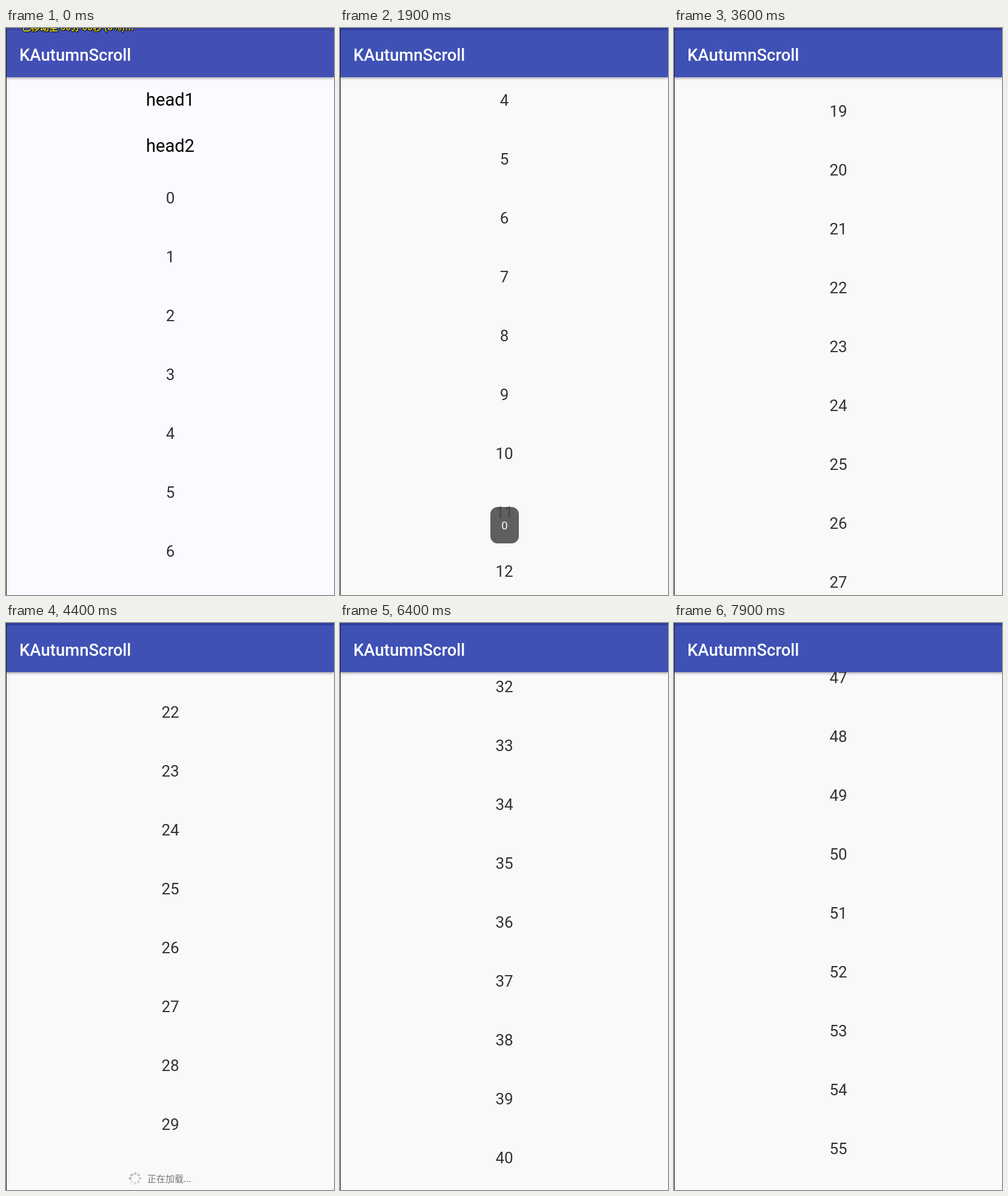
An HTML page for the animation above (8 s loop, 541 by 934 pixels).

```html
<!DOCTYPE html>
<html lang="en">
<head>
<meta charset="utf-8">
<title>Scrolling list</title>
<style>
html, body { margin: 0; width: 100%; height: 100%; overflow: hidden; }
body { font-family: Roboto, sans-serif; }
#stage { position: relative; width: 541px; height: 934px; overflow: hidden; background: #f9f9f9; }
#stage.intro { background: #fcfaff; }
#list { position: absolute; left: 1px; top: 80px; width: 540px; text-align: center; }
.head { height: 76px; font-size: 29px; line-height: 76px; color: #000; }
.item { height: 97px; font-size: 26px; line-height: 97px; color: #333; }
#footer { position: absolute; left: 0; top: 3062px; width: 540px; height: 97px; background: #f9f9f9; }
#loader { position: absolute; inset: 0; }
#spinner { position: absolute; left: 201px; top: 29px; }
#loader span {
  position: absolute; left: 232px; top: 28px; white-space: nowrap;
  font: 15px/24px "Noto Sans CJK SC", "Noto Sans CJK", sans-serif; color: #777;
}
#bar {
  position: absolute; left: 0; top: 0; width: 541px; height: 81px; box-sizing: border-box;
  background: #3f51b5; border-top: 4px solid #303f9f; box-shadow: 0 2px 4px rgba(0, 0, 0, .32);
}
.intro #bar { background: #424fb5; border-color: #3a46a4; }
#bar h1 { margin: 0; padding-left: 22px; font-size: 27.5px; font-weight: 500; line-height: 82px; color: #fff; }
#caption {
  display: none; position: absolute; left: 26px; top: -12px; white-space: pre;
  font: bold 15px/20px "Noto Sans CJK SC", "Noto Sans CJK", sans-serif; color: #d6cc1c;
  text-shadow: 1px 0 #111, -1px 0 #111, 0 1px #111, 1px 1px #111;
}
.intro #caption { display: block; }
#toast {
  position: absolute; left: 248px; top: 789px; width: 47px; height: 60px; border-radius: 12px;
  background: rgba(73, 73, 73, .87); color: #fafafa; font-size: 18.5px; line-height: 62px; text-align: center;
}
#edge { position: absolute; left: 0; top: 0; width: 1px; height: 100%; background: #1a1a1a; }
</style>
</head>
<body>
<div id="stage" class="intro">
  <div id="list">
    <div class="head">head1</div>
    <div class="head">head2</div>
    <div id="footer">
      <div id="loader">
        <svg id="spinner" width="22" height="22" fill="#b5b5b5"></svg>
        <span>正在加载...</span>
      </div>
    </div>
  </div>
  <div id="bar"><h1>KAutumnScroll</h1></div>
  <div id="caption">已移动至 00分 00秒 (0%)...</div>
  <div id="toast">0</div>
  <div id="edge"></div>
</div>
<script>
const LOOP = 8000, TICK = 100, ITEMS = 60, DOTS = 8;
const $ = id => document.getElementById(id);
const stage = $('stage'), list = $('list'), footer = $('footer');
const loader = $('loader'), spinner = $('spinner'), toast = $('toast');

// Each swipe: first tick, number of ticks, scroll offset reached.
const swipes = [
  [1100, 9, 549], [2100, 6, 1030], [2800, 5, 1726], [3500, 4, 2246], [4200, 2, 2267],
  [5100, 5, 2651], [5800, 4, 3180], [6400, 4, 3814], [7000, 4, 4447], [7500, 5, 4749]
];

for (let i = 0; i < ITEMS; i++) {
  const row = document.createElement('div');
  row.className = 'item';
  row.textContent = i;
  list.insertBefore(row, footer);
}

const dots = Array.from({ length: DOTS }, (_, i) => {
  const dot = document.createElementNS('http://www.w3.org/2000/svg', 'circle');
  const a = i / DOTS * 2 * Math.PI;
  dot.setAttribute('cx', 11 + 8 * Math.cos(a));
  dot.setAttribute('cy', 11 + 8 * Math.sin(a));
  dot.setAttribute('r', 2.3);
  return spinner.appendChild(dot);
});

const clamp = v => Math.max(0, Math.min(1, v));
const smooth = u => u * u * (3 - 2 * u);

function scrollAt(t) {
  let y = 0;
  for (const [start, ticks, end] of swipes) {
    const u = clamp((t - start + TICK) / (ticks * TICK));
    y += (end - y) * smooth(u);
    if (u < 1) break;
  }
  return Math.round(y);
}

function draw(t) {
  stage.classList.toggle('intro', t < 200);
  list.style.transform = `translateY(${-scrollAt(t)}px)`;
  footer.style.display = t < 5100 ? 'block' : 'none';
  loader.style.display = t >= 4200 ? 'block' : 'none';
  dots.forEach((dot, i) => {
    const phase = (i - t / TICK % DOTS + DOTS) % DOTS;
    dot.setAttribute('opacity', 1 - .1 * phase);
  });
  toast.style.opacity = clamp((t - 200) / 400) * clamp((2600 - t) / 400);
}

function frame() {
  const t = performance.now() % LOOP;
  draw(Math.floor(t / TICK) * TICK);
  requestAnimationFrame(frame);
}
frame();
</script>
</body>
</html>
```
